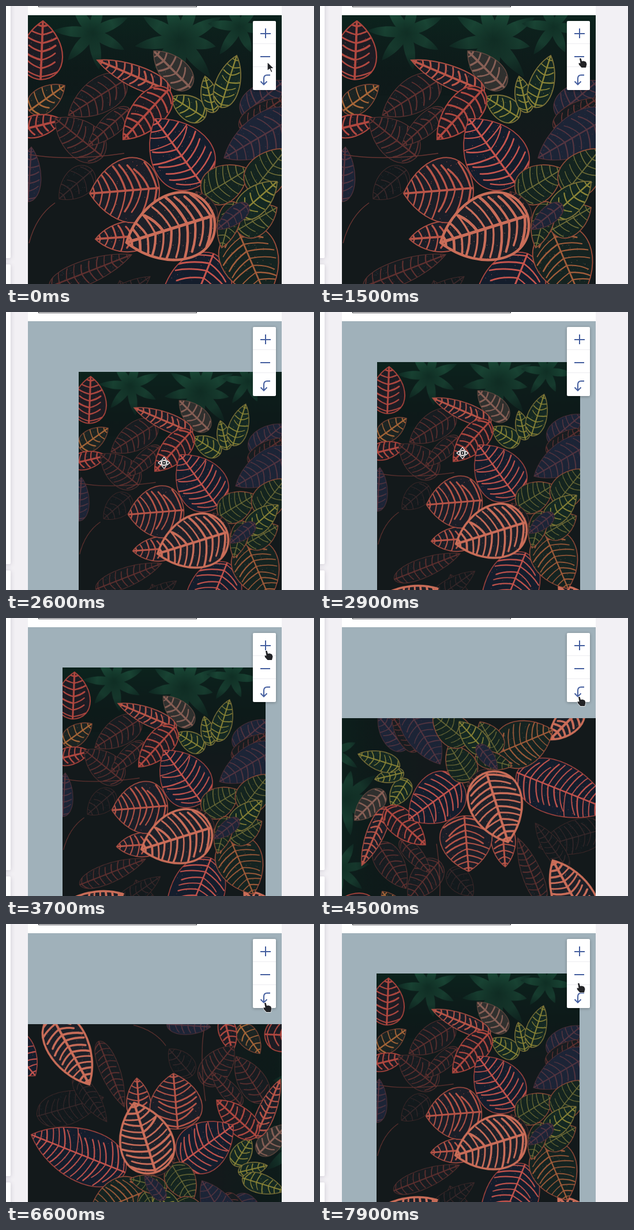
An HTML page with a canvas that plays this animation: 534x483 px, repeating every 8 s.

```html
<!DOCTYPE html>
<html lang="en">
<head>
<meta charset="utf-8">
<title>Photo editor</title>
<style>
html, body { margin: 0; width: 100%; height: 100%; overflow: hidden; background: #f2f0f4; }
canvas { display: block; }
</style>
</head>
<body>
<canvas id="stage" width="534" height="483"></canvas>
<script>
const LOOP = 8000, STEP = 100;
const CENTER = [258, 346];
const stage = document.getElementById('stage').getContext('2d');

let seed = 7;
function rnd() {
  seed = (seed * 16807) % 2147483647;
  return seed / 2147483647;
}
const jitter = a => (rnd() - 0.5) * 2 * a;

// fill, vein, edge, vein width, edge width
const STYLES = {
  navy:   ['#141d2c', '#c5544d', '#a8453f', 2.6, 1.8],
  salmon: ['#1d2028', '#ca6d59', '#c96d58', 4.2, 4.5],
  coral:  ['#1b1e27', '#b85548', '#a84d42', 3, 2],
  red:    ['#1d1c23', '#b04840', '#a9443c', 3, 2.2],
  dim:    ['#171c20', '#5e302f', '#56302f', 2, 1.3],
  dark:   ['#13191c', '#38282a', '#432a2a', 1.6, 1.1],
  blue:   ['#1c2436', '#543540', '#4f3039', 2, 1.3],
  amber:  ['#1c2422', '#a66638', '#7d4434', 2.4, 1.6],
  lime:   ['#142822', '#8a8436', '#7c7138', 2, 1.8],
  green:  ['#14241f', '#6c6b37', '#8f4c38', 1.6, 1.7],
  orange: ['#152320', '#a05c3a', '#9c4d3a', 2.3, 1.8],
  grey:   ['#30302e', '#886056', '#62483f', 3, 1.5]
};

function outline(g, len, w) {
  g.beginPath();
  g.moveTo(0, 0);
  g.bezierCurveTo(len * 0.04, -w * 1.4, len * 0.68, -w * 1.3, len, 0);
  g.bezierCurveTo(len * 0.68, w * 1.3, len * 0.04, w * 1.4, 0, 0);
}

// Stalk end, tip, half width
function leaf(g, [ax, ay, bx, by, w, name]) {
  const [fill, vein, edge, vw, ew] = STYLES[name];
  const len = Math.hypot(bx - ax, by - ay);
  g.save();
  g.translate(ax, ay);
  g.rotate(Math.atan2(by - ay, bx - ax));
  outline(g, len, w);
  g.fillStyle = fill;
  g.fill();
  g.save();
  g.clip();
  for (let i = 0; i < len * w / 35; i++) {
    g.fillStyle = i % 4 ? 'rgba(80,110,135,.3)' : vein;
    g.fillRect(rnd() * len, jitter(w), 1, 1);
  }
  g.strokeStyle = vein;
  g.lineCap = 'round';
  const count = Math.max(4, Math.round(len / 14));
  for (let i = 0; i < count; i++) {
    for (const side of [-1, 1]) {
      const x = (i + 0.35) / count * len;
      const reach = w * (0.8 + jitter(0.18));
      const lean = w * 0.36 + jitter(3);
      g.lineWidth = vw * (0.75 + rnd() * 0.45);
      g.beginPath();
      g.moveTo(x, 0);
      g.quadraticCurveTo(x + lean * 0.3, side * reach * 0.6, x + lean, side * reach);
      g.stroke();
    }
  }
  g.lineWidth = vw * 1.25;
  g.beginPath();
  g.moveTo(0, 0);
  g.lineTo(len, 0);
  g.stroke();
  g.restore();
  outline(g, len, w);
  g.strokeStyle = edge;
  g.lineWidth = ew;
  g.stroke();
  g.restore();
}

function star(g, x, y, r, n, turn) {
  for (let i = 0; i < n; i++) {
    g.save();
    g.translate(x, y);
    g.rotate(turn + i / n * Math.PI * 2);
    const tint = g.createLinearGradient(0, 0, r, 0);
    tint.addColorStop(0, '#123b2c');
    tint.addColorStop(0.6, '#1f5740');
    tint.addColorStop(1, '#12382c');
    g.fillStyle = tint;
    outline(g, r * (0.85 + 0.3 * rnd()), r * 0.15);
    g.fill();
    g.restore();
  }
}

const BACK = [
  [60, 128, 64, 26, 36, 'red'],
  [40, 182, 102, 138, 22, 'amber'],
  [22, 216, 98, 198, 19, 'red'],
  [168, 262, 85, 195, 32, 'dim'],
  [207, 128, 108, 190, 30, 'dim'],
  [38, 340, 44, 245, 20, 'blue'],
  [150, 285, 92, 335, 25, 'dark'],
  [75, 488, 218, 432, 21, 'dim'],
  [238, 621, 197, 477, 36, 'dark'],
  [150, 540, 250, 470, 20, 'dark'],
  [20, 590, 169, 508, 44, 'salmon'],
  [60, 700, 150, 625, 42, 'navy'],
  [320, 142, 256, 78, 24, 'grey'],
  [285, 148, 158, 94, 19, 'coral'],
  [345, 194, 287, 158, 21, 'lime'],
  [360, 185, 345, 122, 15, 'lime'],
  [372, 176, 400, 86, 21, 'lime'],
  [410, 190, 482, 130, 26, 'blue'],
  [405, 212, 482, 160, 18, 'dim'],
  [505, 190, 378, 264, 36, 'blue']
];

const FRONT = [
  [214, 178, 142, 243, 18, 'dim'],
  [282, 145, 203, 232, 29, 'red'],
  [360, 430, 278, 634, 57, 'navy'],
  [500, 570, 432, 502, 26, 'salmon'],
  [400, 385, 452, 508, 50, 'orange'],
  [250, 398, 155, 405, 26, 'coral'],
  [266, 316, 145, 326, 56, 'coral'],
  [340, 310, 258, 196, 53, 'navy'],
  [342, 330, 420, 283, 32, 'green'],
  [425, 325, 486, 248, 34, 'green'],
  [350, 385, 330, 322, 24, 'dim'],
  [360, 364, 209, 411, 57, 'salmon'],
  [400, 390, 470, 350, 27, 'green'],
  [402, 365, 470, 305, 24, 'lime'],
  [395, 340, 374, 420, 19, 'green'],
  [420, 345, 366, 388, 15, 'blue']
];

function paintPhoto() {
  const c = document.createElement('canvas');
  c.width = 440;
  c.height = 660;
  const g = c.getContext('2d');
  g.translate(-38, -16);
  const bg = g.createLinearGradient(0, 16, 0, 230);
  bg.addColorStop(0, '#0c271f');
  bg.addColorStop(0.5, '#0e1c1b');
  bg.addColorStop(1, '#13191b');
  g.fillStyle = bg;
  g.fillRect(38, 16, 440, 660);
  star(g, 302, 58, 74, 9, 0.2);
  star(g, 150, 46, 62, 7, 0.5);
  star(g, 405, 36, 56, 6, 0.1);
  const shade = g.createLinearGradient(0, 16, 0, 140);
  shade.addColorStop(0, 'rgba(12,25,24,.25)');
  shade.addColorStop(1, 'rgba(14,25,25,.75)');
  g.fillStyle = shade;
  g.fillRect(38, 16, 440, 140);
  BACK.forEach(l => leaf(g, l));
  g.strokeStyle = '#673431';
  g.lineWidth = 1.5;
  g.beginPath();
  g.moveTo(40, 412);
  g.quadraticCurveTo(52, 365, 85, 342);
  g.moveTo(40, 258);
  g.quadraticCurveTo(110, 270, 205, 256);
  g.stroke();
  FRONT.forEach(l => leaf(g, l));
  return c;
}
const photo = paintPhoto();

// Each key: time, x, y
const POINTER = [
  [0, 453, 97], [100, 453, 97], [200, 465, 108], [400, 465, 108],
  [700, 402, 144], [800, 402, 144], [1000, 468, 98], [1400, 468, 98],
  [1500, 451, 91], [1900, 451, 91], [2200, 221, 232], [2300, 221, 232],
  [2400, 232, 242], [2600, 274, 262], [2900, 247, 245], [3000, 246, 244],
  [3200, 257, 290], [3700, 451, 57], [3800, 451, 57], [4000, 440, 180],
  [4100, 440, 180], [4200, 449, 137], [7200, 449, 137], [7300, 447, 163],
  [7600, 447, 163], [7800, 452, 67], [7900, 448, 103]
];
const DRAG = [[2300, 0, 0], [2400, 2, 2], [2600, 44, 22], [2900, 17, 5], [3000, 16, 4]];

function at(keys, t) {
  let a = keys[0];
  for (const b of keys) {
    if (t < b[0]) {
      const k = Math.max(0, (t - a[0]) / (b[0] - a[0]));
      return [a[1] + (b[1] - a[1]) * k, a[2] + (b[2] - a[2]) * k];
    }
    a = b;
  }
  return [a[1], a[2]];
}

function poly(g, pts) {
  g.beginPath();
  pts.forEach(([x, y]) => g.lineTo(x, y));
  g.closePath();
}

function card(g, x, y, w, h, blur, tone) {
  g.save();
  g.shadowColor = tone;
  g.shadowBlur = blur;
  g.shadowOffsetY = 1;
  g.fillStyle = '#fff';
  g.beginPath();
  g.roundRect(x, y, w, h, 2);
  g.fill();
  g.restore();
}

function drawPage(g) {
  g.fillStyle = '#f2f0f4';
  g.fillRect(0, 0, 534, 483);
  card(g, -20, -20, 28, 458, 8, 'rgba(60,50,80,.2)');
  card(g, -20, 449, 28, 60, 8, 'rgba(60,50,80,.2)');
  g.fillStyle = '#fff';
  g.fillRect(38, 0, 440, 16);
  g.strokeStyle = '#3b3d42';
  g.lineWidth = 1;
  g.strokeRect(56.5, -9.5, 274, 11);
  g.fillStyle = '#a0b1ba';
  g.fillRect(38, 16, 440, 467);
}

function drawPhoto(g, t) {
  const zoom = t < 1600 ? 1 : 0.8;
  const [dx, dy] = at(DRAG, t);
  const turns = [4300, 5400, 6600, 7100].filter(s => t >= s).length;
  g.save();
  g.beginPath();
  g.rect(38, 16, 440, 467);
  g.clip();
  g.translate(CENTER[0] + dx, CENTER[1] + dy);
  g.rotate(-turns * Math.PI / 2);
  g.scale(zoom, zoom);
  g.drawImage(photo, -220, -330);
  g.restore();
}

function drawTools(g) {
  card(g, 428, 26, 40, 120, 5, 'rgba(0,0,0,.3)');
  g.fillStyle = '#ececf0';
  g.fillRect(428, 65, 40, 1);
  g.fillRect(428, 105, 40, 1);
  g.fillStyle = '#455f9f';
  g.fillRect(441, 47, 18, 2);
  g.fillRect(449, 39, 2, 17);
  g.fillRect(441, 87, 17, 2);
  g.strokeStyle = '#455f9f';
  g.lineWidth = 2;
  g.beginPath();
  g.moveTo(458, 120);
  g.lineTo(453, 120);
  g.quadraticCurveTo(447, 120, 447, 126);
  g.lineTo(447, 136);
  g.moveTo(441.5, 131);
  g.lineTo(447, 136.5);
  g.lineTo(452.5, 131);
  g.stroke();
}

function drawArrow(g) {
  poly(g, [[0, 0], [0, 16], [4, 12.6], [6.6, 18.6], [9.2, 17.4], [6.6, 11.6], [11.6, 11.4]]);
  g.fill();
  g.stroke();
}

function drawHand(g) {
  poly(g, [[-1, 0], [1.5, 0], [3, 5], [6, 4.6], [10, 6], [11.5, 10], [10, 16],
    [2.5, 16], [-2, 11], [-2.5, 8], [0.5, 8.5]]);
  g.stroke();
  g.fill();
}

function drawMove(g) {
  g.lineWidth = 1.2;
  for (let i = 0; i < 4; i++) {
    g.rotate(Math.PI / 2);
    poly(g, [[0, -10], [4, -5], [-4, -5]]);
    g.fill();
    g.stroke();
  }
  g.fillRect(-3.5, -3.5, 7, 7);
  g.strokeRect(-3.5, -3.5, 7, 7);
  g.fillStyle = '#fff';
  g.fillRect(-1, -1, 2, 2);
}

function drawPointer(g, t) {
  const [x, y] = at(POINTER, t);
  const overTool = x >= 428 && x < 468 && y >= 26 && y < 146;
  g.save();
  g.translate(x, y);
  g.fillStyle = '#222326';
  g.strokeStyle = '#fff';
  g.lineWidth = 1.3;
  g.lineJoin = 'round';
  if (t >= 2400 && t <= 3000) drawMove(g);
  else if (overTool && t >= 1500) drawHand(g);
  else drawArrow(g);
  g.restore();
}

const start = performance.now();
function frame() {
  const t = Math.floor((performance.now() - start) % LOOP / STEP) * STEP;
  drawPage(stage);
  drawPhoto(stage, t);
  drawTools(stage);
  drawPointer(stage, t);
  requestAnimationFrame(frame);
}
frame();
</script>
</body>
</html>
```
